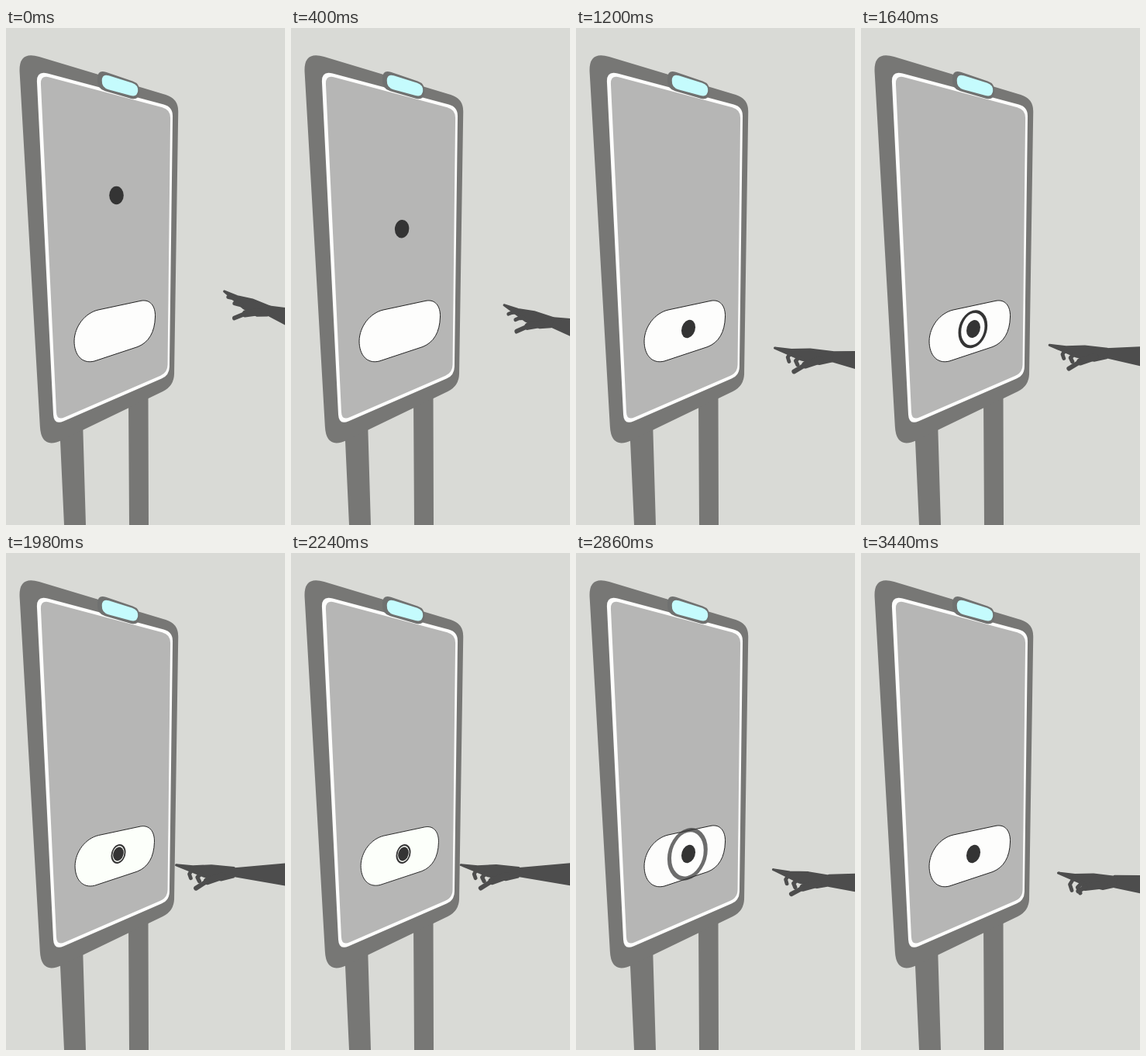
An HTML page that plays this animation: 360 by 640 pixels, repeating every 3.62 s.

```html
<!DOCTYPE html>
<html lang="en">
<head>
<meta charset="utf-8">
<title>Touch panel</title>
<style>
  html, body { margin: 0; width: 100%; height: 100%; overflow: hidden; background: #d9dad6; }
  svg { display: block; width: 100%; height: 100%; }
  .skin { fill: #4d4d4d; stroke: #4d4d4d; stroke-width: 3; stroke-linejoin: round; }
  .limb { fill: none; stroke: #4d4d4d; stroke-linecap: round; stroke-linejoin: round; }
</style>
</head>
<body>
<svg viewBox="0 0 360 640">
  <rect width="360" height="640" fill="#d9dad6"/>
  <path fill="#777775" d="M69 510 75 640H103L99 505ZM158 475 159 640H184L183.500 465Z"/>
  <g id="panel"></g>

  <path id="button" stroke="#222" d="M119 363 174 351.300C186 349 193 358 192.500 372C192 392 184 405 170 410.500L114 429C98 433 88 421 88 403C88.500 384 102 367 119 363Z"/>
  <ellipse id="ring" rx="23.200" ry="30.300" fill="none" stroke="#343434" stroke-width="5"/>
  <ellipse id="dot" rx="9.300" ry="11.800" fill="#343434"/>

  <path id="arm" class="skin"/>
  <g id="hand">
    <path class="skin" d="M-72.500-11-51-8.500-27-9 2-5.500 1 6-15 9.500-38 4Z"/>
    <path id="middle" class="limb" stroke-width="4.800"/>
    <path id="third" class="limb" stroke-width="5.200"/>
    <path id="thumbBase" class="limb" stroke-width="9.500"/>
    <path id="thumb" class="limb" stroke-width="6"/>
  </g>
</svg>
<script>
const LOOP = 3620;
const $ = id => document.getElementById(id);
const mix = (a, b, k) => a + (b - a) * k;
const clamp = x => Math.min(1, Math.max(0, x));
const ease = x => (1 - Math.cos(Math.PI * clamp(x))) / 2;
const span = (t, from, to) => ease((t - from) / (to - from));
const set = (id, name, value) => $(id).setAttribute(name, value);

// Four-cornered plate; each corner is [x, y, radius]
function plate(fill, ...corners) {
  const toward = ([x, y, r], [u, v]) => {
    const k = r / Math.hypot(u - x, v - y);
    return `${mix(x, u, k)} ${mix(y, v, k)}`;
  };
  const d = corners.map((c, i) => {
    const prev = corners[(i + 3) % 4], next = corners[(i + 1) % 4];
    return `${i ? "L" : "M"}${toward(c, prev)}Q${c[0]} ${c[1]} ${toward(c, next)}`;
  }).join("") + "Z";
  const path = document.createElementNS("http://www.w3.org/2000/svg", "path");
  path.setAttribute("d", d);
  path.setAttribute("fill", fill);
  $("panel").append(path);
}

plate("#777775", [16, 29, 28], [222.5, 91, 17], [216.8, 461, 16], [45.6, 543.5, 30]);
plate("#fdfdfc", [39.2, 54.6, 15], [215.2, 101.5, 12], [210.8, 447.2, 11], [61.7, 511.8, 14]);
plate("#b6b6b5", [44.4, 60.4, 12], [212.2, 105, 11], [208.4, 443.8, 10], [65.5, 505.7, 11]);
plate("#707170", [118.5, 53.3, 11], [173, 71.7, 10], [171.5, 93.7, 11], [117.5, 78.3, 11]);
plate("#c5fbfd", [124, 58.6, 9], [171, 73.3, 8.5], [169.5, 89.3, 9], [123.5, 76.8, 9]);

// Chain of two bones from (x, y); angles in degrees below the pointing direction
function bones(x, y, len1, deg1, len2, deg2) {
  const step = (px, py, len, deg) =>
    [px - len * Math.cos(deg * Math.PI / 180), py + len * Math.sin(deg * Math.PI / 180)];
  const bend = step(x, y, len1, deg1);
  const tip = step(...bend, len2, deg2);
  return [`M${x} ${y}L${bend}`, `L${tip}`, `M${bend}L${tip}`];
}

function drawHand(t) {
  const reach = ease(t / 1200);
  const release = span(t, 2440, 2900);
  const press = span(t, 1380, 2020) - release;
  const settle = span(t, 2900, 3440);
  const lift = release - settle;

  const x = 338 - 9 * reach - 37 * press - 2 * release;
  const y = 364 + 59 * reach - 12 * press - lift;
  const turn = 13.6 * (1 - reach) - 1.3 * press + 2.6 * lift;
  set("hand", "transform",
    `translate(${x} ${y}) rotate(${turn}) scale(${mix(0.84, 1, reach)} 1)`);

  const elbow = 372.5 + 55.5 * reach - 14 * press - 3 * lift - settle;
  const thick = 10.5 + 3 * press;
  const wrist = 5.2 - press + 1.5 * release;
  set("arm", "d", `M${x} ${y - wrist}L364 ${elbow - thick}V${elbow + thick}L${x} ${y + wrist}Z`);

  const length = mix(0.8, 1.15, settle);
  const [mid, midEnd] = bones(-52, -5, 9 * length, 58 * reach, 7 * length, 108 * reach);
  const [third, thirdEnd] = bones(-41, 1, 8 * length, 45 * reach, 7 * length, 115 * reach);
  set("middle", "d", mid + midEnd);
  set("third", "d", third + thirdEnd);

  const tuck = mix(1, 0.6, settle);
  const [base, , tip] = bones(-14, 4.5, mix(20, 24, settle), 18 * tuck * tuck, 17 * tuck, 31);
  set("thumbBase", "d", base);
  set("thumb", "d", tip);
}

function drawScreen(t) {
  const drop = ease(t / 1200);
  const grip = span(t, 1280, 1940) - span(t, 2500, 3040);
  const push = span(t, 1700, 2260) - span(t, 2320, 2700);
  const tint = span(t, 1660, 1900) - span(t, 2540, 2700);
  const small = span(t, 1600, 1960) - span(t, 2500, 2780);

  set("button", "transform", `translate(140.500 390) scale(${1 - 0.04 * push}) translate(-140.500 -390)`);
  set("button", "fill", `rgb(${mix(253, 252, tint)},${mix(253, 255, tint)},${mix(252, 250, tint)})`);

  // Both marks lie in the panel's plane, so they shear with its perspective
  const mark = (id, cx, cy, skew, scale) =>
    set(id, "transform", `translate(${cx} ${cy}) skewY(${-skew}) scale(${scale})`);
  mark("dot", mix(142.5, 145, drop), mix(215.5, 387.5, drop), 14 * drop, mix(1, 0.76, small) * mix(1, 0.97, drop));
  mark("ring", mix(143.5, 145, grip), mix(388, 387.5, grip), 14, mix(1.22, 0.37, grip));
  set("ring", "opacity", clamp(grip * 2.9));
}

function frame() {
  const t = performance.now() % LOOP;
  drawScreen(t);
  drawHand(t);
  requestAnimationFrame(frame);
}
frame();
</script>
</body>
</html>
```
